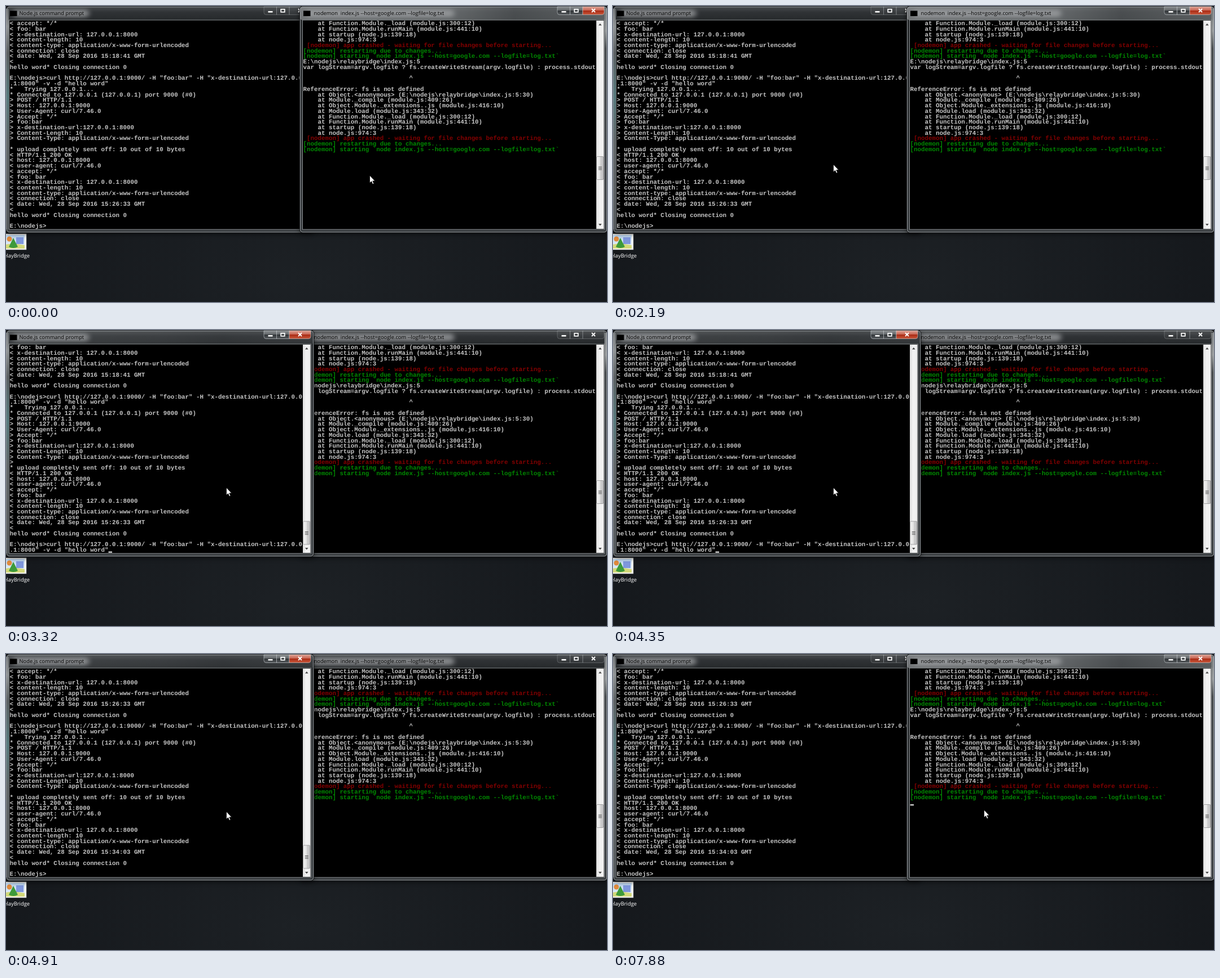
Animation, 1065 px wide and 526 px high, one loop 8 s. Source, as an HTML page:

```html
<!DOCTYPE html>
<html lang="en">
<head>
<meta charset="utf-8">
<title>Terminal session</title>
<style>
html, body { margin: 0; width: 100%; height: 100%; overflow: hidden; background: #15181b; }
svg { display: block; width: 1065px; height: 526px; }
text { text-rendering: geometricPrecision; }
.term { font: bold 10.8px "Liberation Mono", monospace; fill: #c6c6c6; }
.term .red { fill: #840000; }
.term .green { fill: #008a00; }
.ui { font: 9.35px "Open Sans", sans-serif; }
.button { stroke: #c8cdd0; stroke-width: .8; stroke-opacity: .35; fill: #fff; fill-opacity: .04; }
.sheen { visibility: hidden; }
.active .sheen { visibility: visible; }
.active .button { stroke-opacity: .75; fill: url(#buttonFace); fill-opacity: 1; }
.active .close { fill: url(#closeFace); }
</style>
</head>
<body>
<svg id="stage" xmlns="http://www.w3.org/2000/svg" viewBox="0 0 1065 526">
  <defs>
    <radialGradient id="desk" cx=".5" cy=".92" r=".6">
      <stop offset="0" stop-color="#1d2125"/><stop offset="1" stop-color="#14171b"/>
    </radialGradient>
    <linearGradient id="glass" x2="0" y2="1">
      <stop offset="0" stop-color="#4b4e50"/><stop offset=".025" stop-color="#303336"/>
      <stop offset=".06" stop-color="#26292b"/><stop offset="1" stop-color="#3a3e41"/>
    </linearGradient>
    <linearGradient id="sheen">
      <stop offset="0" stop-color="#a2a5a7"/><stop offset=".5" stop-color="#85898b"/>
      <stop offset=".7" stop-color="#5c6062"/><stop offset="1" stop-color="#7c8082"/>
    </linearGradient>
    <linearGradient id="leftEdge" x2="0" y2="1">
      <stop offset="0" stop-color="#6d7173"/><stop offset=".08" stop-color="#a4a8a9"/>
      <stop offset=".2" stop-color="#565b5d"/><stop offset=".4" stop-color="#4f8083"/>
      <stop offset=".6" stop-color="#5f6567"/><stop offset="1" stop-color="#4a4f52"/>
    </linearGradient>
    <linearGradient id="rightEdge" x2="0" y2="1">
      <stop offset="0" stop-color="#8d9193"/><stop offset=".1" stop-color="#b0b3b4"/>
      <stop offset=".18" stop-color="#4a4e51"/><stop offset="1" stop-color="#3a3e41"/>
    </linearGradient>
    <linearGradient id="buttonFace" x2="0" y2="1">
      <stop offset="0" stop-color="#8d9193"/><stop offset=".5" stop-color="#606467"/>
      <stop offset=".52" stop-color="#303437"/><stop offset="1" stop-color="#55595c"/>
    </linearGradient>
    <linearGradient id="closeFace" x2="0" y2="1">
      <stop offset="0" stop-color="#dfa598"/><stop offset=".5" stop-color="#c7604d"/>
      <stop offset=".52" stop-color="#a92a14"/><stop offset="1" stop-color="#c9583c"/>
    </linearGradient>
    <linearGradient id="track">
      <stop offset="0" stop-color="#dedede"/><stop offset=".4" stop-color="#f2f2f2"/>
      <stop offset="1" stop-color="#f0f0f0"/>
    </linearGradient>
    <linearGradient id="thumb">
      <stop offset="0" stop-color="#f4f4f4"/><stop offset=".5" stop-color="#e2e2e2"/>
      <stop offset=".55" stop-color="#cecece"/><stop offset="1" stop-color="#c2c2c4"/>
    </linearGradient>
    <linearGradient id="sky" x2="0" y2="1">
      <stop offset="0" stop-color="#b9d3ef"/><stop offset="1" stop-color="#eef5fa"/>
    </linearGradient>
    <filter id="soft" x="-20%" y="-60%" width="140%" height="220%"><feGaussianBlur stdDeviation="5 3"/></filter>
    <filter id="shadow" x="-5%" y="-5%" width="110%" height="112%"><feGaussianBlur stdDeviation="4"/></filter>
  </defs>
  <rect width="1065" height="526" fill="url(#desk)"/>
  <g id="deskIcon">
    <rect x="-6" y="405" width="42" height="28" fill="#f6f6f2" stroke="#b5b8ba" stroke-width=".6"/>
    <rect x="-4" y="407" width="37" height="24" fill="url(#sky)"/>
    <path d="M-4 425q14-5 37 0v6h-37z" fill="#d3d97a"/>
    <rect x="18" y="411" width="13" height="12" fill="#7f97dc"/>
    <circle cx="6" cy="414" r="4.5" fill="#e08a3c"/>
    <path d="M13 412l8 16q-8 4-16 0z" fill="#3d9a3a"/>
    <text class="ui" x="42" y="447.3" text-anchor="end" fill="#fff">RelayBridge</text>
  </g>
  <g id="windows"></g>
  <path id="pointer" d="M0 0V13.6L3.1 10.7L5.2 15.6L7.4 14.7L5.3 9.9H9.4Z" fill="#fff" stroke="#000" stroke-width=".8"/>
</svg>
<script>
const LOOP = 8000, ROW = 9.73, COL = 6.48;
const $ = id => document.getElementById(id);

function add(parent, tag, attrs = {}, content = '') {
  const node = document.createElementNS('http://www.w3.org/2000/svg', tag);
  for (const key in attrs) node.setAttribute(key, attrs[key]);
  if (content) node.textContent = content;
  return parent.appendChild(node);
}
const rect = (parent, x, y, width, height, attrs) => add(parent, 'rect', { x, y, width, height, ...attrs });

function makeWindow({ x, right, title, titleX, glow, sheen, edge, thumbY }) {
  const g = add($('windows'), 'g');
  const width = right - x, barX = right - 20;
  rect(g, x, 3, width, 402, { rx: 6, fill: '#000', opacity: .6, filter: 'url(#shadow)' });
  rect(g, x + .5, .8, width - 1, 402, { rx: 5, fill: 'url(#glass)', stroke: '#08090a' });
  rect(g, edge.x, 5, 5, 392, { fill: edge.fill, opacity: .8 });
  rect(g, x + 1, 1.5, width - 2, 23.5, { class: 'sheen', rx: 4.5, fill: 'url(#sheen)', opacity: sheen });
  rect(g, x + 1.4, 1.6, width - 2.8, 400.3, { rx: 4.5, fill: 'none', stroke: '#b9bec1', 'stroke-width': .9, 'stroke-opacity': .85 });
  rect(g, x + 12, 6, glow, 14, { rx: 6, fill: '#a0a3a5', opacity: .72, filter: 'url(#soft)' });
  rect(g, x + 7, 8.5, 12.5, 9.5, { fill: '#000' });
  const label = add(g, 'text', { class: 'ui', x: titleX, y: 16.4, fill: '#050505' }, title);

  const controls = add(g, 'g', { transform: `translate(${right - 89} 0)` });
  add(controls, 'path', { class: 'button', d: 'M0 1H22.5V15.5H4Q0 15.5 0 11.5Z' });
  rect(controls, 22.5, 1, 22.5, 14.5, { class: 'button' });
  add(controls, 'path', { class: 'button close', d: 'M45 1H83V11.5Q83 15.5 79 15.5H45Z' });
  rect(controls, 7.5, 9, 8, 2.6, { fill: '#fff' });
  rect(controls, 30.2, 5.8, 6.6, 5, { fill: 'none', stroke: '#fff', 'stroke-width': 1.7 });
  add(controls, 'path', { d: 'M61 5L67 11M67 5L61 11', stroke: '#fff', 'stroke-width': 1.9 });

  rect(g, x + 5.5, 25, width - 11, 372, { fill: '#000', stroke: '#92979a', 'stroke-width': .9 });
  rect(g, barX, 26, 13.5, 370, { fill: 'url(#track)' });
  add(g, 'path', { d: `M${barX + 4} 34.5h5.6l-2.8-3.4zM${barX + 4} 387h5.6l-2.8 3.4z`, fill: '#454545' });
  rect(g, barX + .7, thumbY, 12, 41, { rx: 1.5, fill: 'url(#thumb)', stroke: '#8e8f90', 'stroke-width': .8 });
  for (const dy of [18, 20.4, 22.8]) rect(g, barX + 3.8, thumbY + dy, 6, 1, { fill: '#555' });

  const term = add(g, 'g', { class: 'term' });
  const caret = rect(g, 0, 0, COL, 2.5, { fill: '#c8c8c8' });
  return { g, label, term, caret, textX: x + 6.6 };
}

function setLines(win, lines) {
  win.term.replaceChildren();
  lines.forEach((line, row) => {
    const name = line.includes('[nodemon]') ? (line.includes('crashed') ? 'red' : 'green') : '';
    if (line) add(win.term, 'text', { class: name, x: win.textX, y: 34.1 + row * ROW }, line.replaceAll(' ', '\u00a0'));
  });
}

function setCaret(win, col, row, visible) {
  win.caret.setAttribute('x', win.textX + col * COL);
  win.caret.setAttribute('y', 33.4 + row * ROW);
  win.caret.setAttribute('visibility', visible ? 'visible' : 'hidden');
}

const split = text => text.split('\n');
const prompt = 'E:\\nodejs>';
const command = [
  prompt + 'curl http://127.0.0.1:9000/ -H "foo:bar" -H "x-destination-url:127.0.0',
  '.1:8000" -v -d "hello word"'
];
const reply = time => split(`< accept: */*
< foo: bar
< x-destination-url: 127.0.0.1:8000
< content-length: 10
< content-type: application/x-www-form-urlencoded
< connection: close
< date: Wed, 28 Sep 2016 ${time} GMT
<
hello word* Closing connection 0
`);
const request = mark => split(`*   Trying 127.0.0.1...
* Connected to 127.0.0.1 (127.0.0.1) port 9000 (#0)
> POST / HTTP/1.1
> Host: 127.0.0.1:9000
> User-Agent: curl/7.46.0
> Accept: */*
> foo:bar
> x-destination-url:127.0.0.1:8000
> Content-Length: 10
> Content-Type: application/x-www-form-urlencoded
${mark}
* upload completely sent off: 10 out of 10 bytes
< HTTP/1.1 200 OK
< host: 127.0.0.1:8000
< user-agent: curl/7.46.0`);
const session = (before, after, mark = '') => [...reply(before), ...command, ...request(mark), ...reply(after)];

const idle = [...session('15:18:41', '15:26:33'), prompt];
const typed = [...session('15:18:41', '15:26:33', '>').slice(1), ...command];
const sent = [...typed.slice(1), ''];
const done = [...session('15:26:33', '15:34:03'), prompt];

const stack = `    at Function.Module._load (module.js:300:12)
    at Function.Module.runMain (module.js:441:10)
    at startup (node.js:139:18)
    at node.js:974:3
 [nodemon] app crashed - waiting for file changes before starting...
[nodemon] restarting due to changes...
[nodemon] starting \`node index.js --host=google.com --logfile=log.txt\``;
const watcherLines = split(`${stack}
E:\\nodejs\\relaybridge\\index.js:5
var logStream=argv.logfile ? fs.createWriteStream(argv.logfile) : process.stdout

${' '.repeat(29)}^

ReferenceError: fs is not defined
    at Object.<anonymous> (E:\\nodejs\\relaybridge\\index.js:5:30)
    at Module._compile (module.js:409:26)
    at Object.Module._extensions..js (module.js:416:10)
    at Module.load (module.js:343:32)
${stack}`);

const shellTitle = 'Node.js command prompt';
const shell = makeWindow({
  x: 0, right: 546, title: shellTitle, titleX: 23.5, glow: 135, sheen: .15,
  edge: { x: 0, fill: 'url(#leftEdge)' }, thumbY: 340
});
const watcher = makeWindow({
  x: 520, right: 1066, title: 'nodemon\u00a0 index.js --host=google.com --logfile=log.txt', titleX: 545.5,
  glow: 262, sheen: .6, edge: { x: 1060.5, fill: 'url(#rightEdge)' }, thumbY: 267.5
});
setLines(watcher, watcherLines);

// [time, x, y] of the pointer tip
const pointerPath = [
  [0, 644.5, 301], [420, 590, 312], [550, 512.5, 319], [700, 441.5, 315], [820, 470, 308],
  [950, 525.5, 298], [1100, 565, 297.5], [1230, 610, 297.5], [1350, 632.5, 298], [1490, 638, 270],
  [1610, 635.5, 234.5], [1760, 659.5, 259], [1910, 545, 256], [2030, 400.5, 281], [2190, 390.5, 281.5],
  [2330, 390.5, 280], [6600, 430, 278], [6730, 559.5, 260.5], [6880, 658.5, 252], [7430, 659, 253],
  [7580, 659, 259], [7730, 658.5, 270], [7880, 657.5, 277]
];
const screens = [[0, idle], [3320, typed], [4780, sent], [4910, done]];
const latest = (list, t) => list.findLast(entry => entry[0] <= t);
const within = (t, ...spans) => spans.some(([from, to]) => t >= from && t < to);

let shownLines, front;
function draw(t) {
  const lines = latest(screens, t)[1];
  if (lines !== shownLines) {
    setLines(shell, shownLines = lines);
    shell.label.textContent = lines === sent
      ? shellTitle + ' - curl\u00a0 http://127.0.0.1:9000/ -H "foo:bar" -H "x-destination-url...'
      : shellTitle;
  }
  const active = within(t, [2330, 7030]) ? shell : watcher;
  if (active !== front) {
    front = active;
    $('windows').append(active.g);
    for (const win of [shell, watcher]) win.g.classList.toggle('active', win === active);
  }
  setCaret(shell, lines === typed ? command[1].length : prompt.length, 37,
    within(t, [2730, 3920], [4350, 4780], [5900, 6460]));
  setCaret(watcher, 0, 24, within(t, [420, 950], [1490, 2030], [7580, LOOP]));
  const [, x, y] = latest(pointerPath, t);
  $('pointer').setAttribute('transform', `translate(${x} ${y})`);
}

const start = performance.now();
function tick() {
  draw((performance.now() - start) % LOOP);
  requestAnimationFrame(tick);
}
tick();
</script>
</body>
</html>
```
